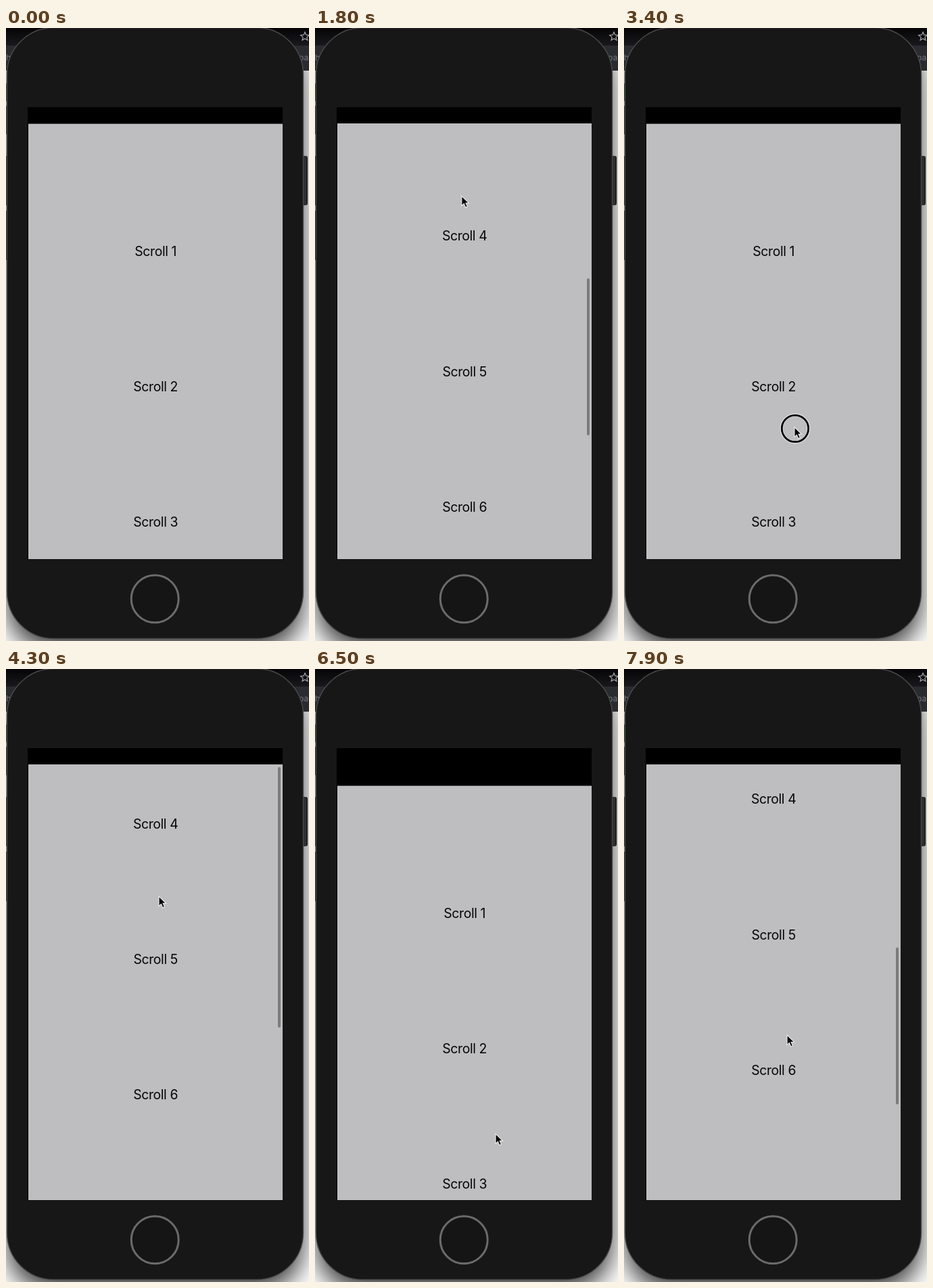
An HTML page that plays this animation: 448x906 px, repeating every 8 s.

```html
<!DOCTYPE html>
<html lang="en">
<head>
<meta charset="utf-8">
<title>Scrolling list</title>
<style>
  html, body { margin: 0; width: 100%; height: 100%; overflow: hidden; background: #fff; }
  svg { display: block; width: 448px; height: 906px; }
  .label { font: 19.4px Inter, Roboto, sans-serif; letter-spacing: -.38px; text-anchor: middle; fill: #050505; }
  .tab { font: 12px Inter, Roboto, sans-serif; fill: #77787c; }
</style>
</head>
<body>
<svg viewBox="0 0 448 906">
  <defs>
    <linearGradient id="top" x2="0" y2="1">
      <stop stop-color="#050507"/><stop offset="1" stop-color="#19191d"/>
    </linearGradient>
    <linearGradient id="key">
      <stop stop-color="#181818"/><stop offset=".6" stop-color="#343434"/><stop offset="1" stop-color="#191919"/>
    </linearGradient>
    <filter id="blur" x="-20%" y="-20%" width="140%" height="140%"><feGaussianBlur stdDeviation="18"/></filter>
    <clipPath id="view"><rect x="33" y="141" width="376" height="644"/></clipPath>
  </defs>

  <rect width="448" height="906" fill="#fff"/>
  <rect x="2" y="12" width="437" height="908" rx="66" opacity=".76" filter="url(#blur)"/>
  <rect y="82" width="20" height="26" fill="#274724"/>
  <rect width="448" height="26" fill="url(#top)"/>
  <rect y="26" width="448" height="37" fill="#2a2b30"/>
  <text class="tab" x="0" y="48">h</text>
  <text class="tab" x="433" y="48">pa</text>
  <path d="M442 6l1.8 4.2 4.6.4-3.5 3 1 4.5-3.9-2.4-3.9 2.4 1-4.5-3.5-3 4.6-.4z" fill="none" stroke="#a5a6aa" stroke-width="1.2"/>

  <g fill="url(#key)">
    <rect x="437" y="189" width="9" height="73" rx="3"/>
    <rect x="-5" y="115" width="10" height="42" rx="2"/>
    <rect x="-5" y="189" width="10" height="73" rx="2"/>
    <rect x="-5" y="270" width="10" height="73" rx="2"/>
  </g>
  <rect x="1.5" y="-.5" width="438" height="903" rx="69" fill="#171717" stroke="#4b4b4b" stroke-width="1.4"/>
  <circle cx="220.2" cy="843.7" r="35" fill="#151515" stroke="#6b6b6b" stroke-width="3"/>
  <rect x="32" y="117" width="377" height="668.5"/>

  <g clip-path="url(#view)">
    <g id="list"><rect x="33" y="141.6" width="376" height="1783" fill="#bebec0"/></g>
    <rect id="bar" x="402" width="4" rx="2" fill="#7b7b7d"/>
  </g>

  <g id="cursor">
    <g id="press" fill="none">
      <circle cx="1" cy="2" r="20" stroke="#e6e6e6" stroke-width="4.6"/>
      <circle cx="1" cy="2" r="19.7" stroke="#000" stroke-width="2.8"/>
    </g>
    <path d="M0 0V14.5L3.4 11.4 5.7 16.8 8.4 15.6 6.1 10.4H10.6Z" stroke="#eee" stroke-width="1.1"/>
  </g>
</svg>
<script>
  const $ = id => document.getElementById(id);
  const LOOP = 8000, STEP = 100, ROWS = 8, ROW_HEIGHT = 200.3;
  const VIEW_TOP = 145, BAR_RATIO = .361;

  // Each gesture eases the list and the pointer from where they were
  const rest = { scroll: 0, x: 23, y: 276 };
  const gestures = [
    { from: 300, to: 600, x: 322, y: 202 },
    { from: 600, to: 800, x: 209, y: 237 },
    { from: 1100, to: 1300, scroll: -5, x: 222, y: 470 },
    { from: 1300, to: 2100, scroll: 726, x: 216, y: 212, drag: 200 },
    { from: 2310, to: 3077, scroll: -33, x: 267, y: 507, drag: 200 },
    { from: 3150, to: 3400, scroll: 0, x: 252, y: 590 },
    { from: 3400, to: 4300, scroll: 702, x: 226, y: 336, drag: 200 },
    { from: 4950, to: 5600, scroll: 262, x: 249.5, y: 294, drag: 200 },
    { from: 5600, to: 6400, scroll: -31, x: 267, y: 687, drag: 700 },
    { from: 6500, to: 6700, scroll: 0 },
    { from: 6700, to: 8200, scroll: 769, x: 240, y: 535, drag: 200 }
  ];

  const easeOut = u => 1 - (1 - u) ** 2;

  function stateAt(t) {
    const state = { ...rest };
    for (const g of gestures) {
      if (t < g.from) break;
      const u = easeOut(Math.min(1, (t - g.from) / (g.to - g.from)));
      for (const key in rest) state[key] += ((g[key] ?? state[key]) - state[key]) * u;
      state.pressed = t - g.from < (g.drag ?? 0);
    }
    return state;
  }

  for (let n = 0; n < ROWS; n++) {
    const label = document.createElementNS("http://www.w3.org/2000/svg", "text");
    label.setAttribute("class", "label");
    label.setAttribute("x", 221.2);
    label.setAttribute("y", 336.6 + n * ROW_HEIGHT);
    label.textContent = "Scroll " + (n + 1);
    $("list").append(label);
  }

  function draw(t) {
    const { scroll, x, y, pressed } = stateAt(t);
    $("list").setAttribute("transform", `translate(0 ${-scroll})`);

    const stretched = t >= 3500 && t < 5000;
    $("bar").setAttribute("y", VIEW_TOP + (stretched ? 0 : scroll * BAR_RATIO));
    $("bar").setAttribute("height", stretched ? 385 : 232);
    $("bar").style.visibility = scroll > 1 ? "visible" : "hidden";

    $("cursor").style.visibility = t < gestures[0].from ? "hidden" : "visible";
    $("cursor").setAttribute("transform", `translate(${x} ${y})`);
    $("press").style.display = pressed ? "" : "none";
  }

  const start = performance.now();
  function tick(now) {
    const t = Math.max(0, now - start) % LOOP;
    draw(Math.floor(t / STEP) * STEP);
    requestAnimationFrame(tick);
  }
  draw(0);
  requestAnimationFrame(tick);
</script>
</body>
</html>
```
